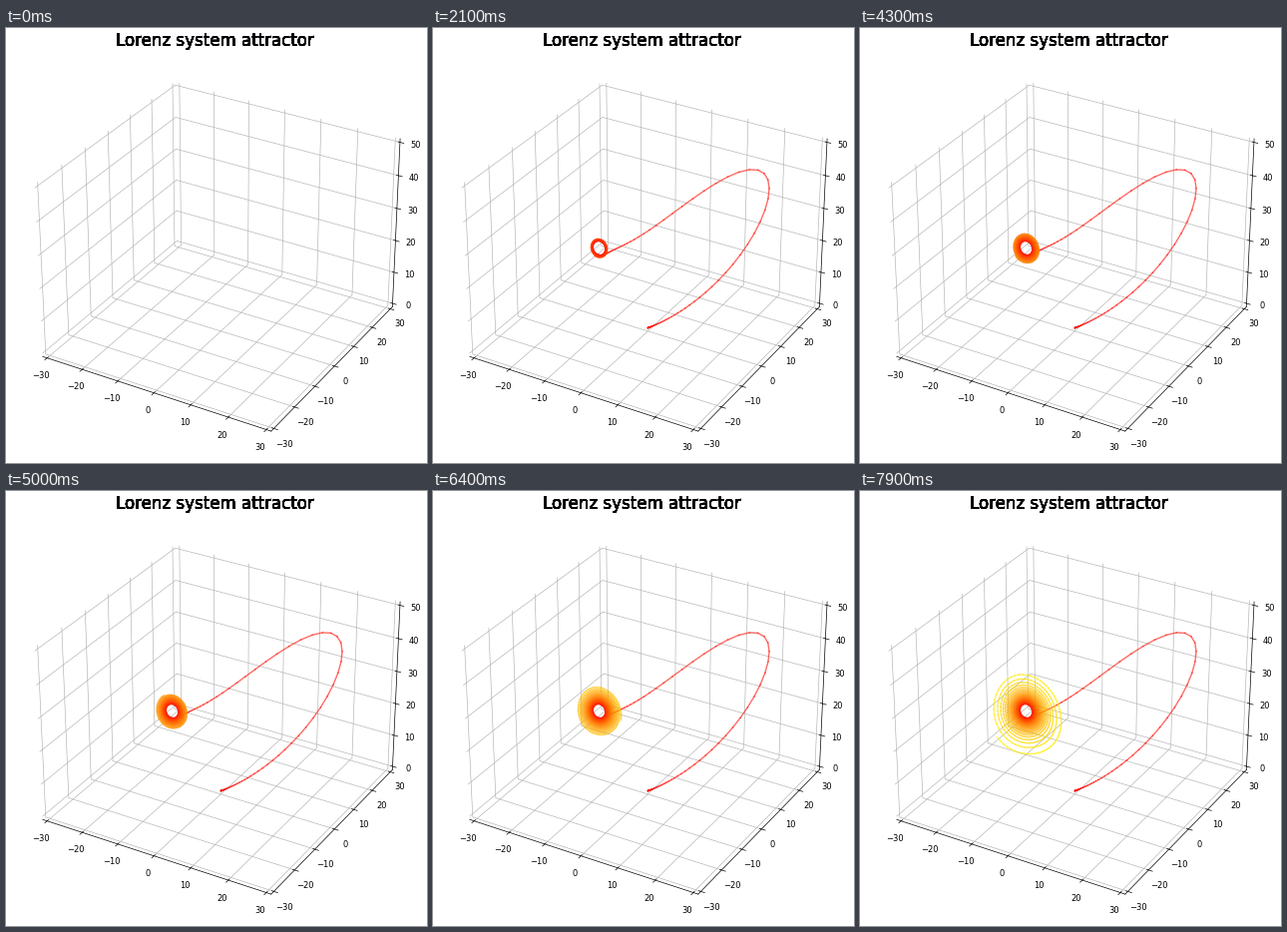
A matplotlib script for the animation above (8000 ms loop, 422 by 436 pixels).

```python
import colorsys

import numpy as np
import matplotlib.pyplot as plt
from matplotlib.animation import FuncAnimation
from mpl_toolkits.mplot3d.art3d import Line3DCollection

W, H, DPI = 422, 436, 100
FRAMES, INTERVAL = 80, 100
PER_FRAME = 20          # segments added each frame
DT = 0.01               # time covered by one segment
HUE_CYCLE = 10000       # segments per full turn of the colour wheel

plt.rcParams.update({
    "axes.linewidth": 0.5,
    "grid.linewidth": 0.45,
    "xtick.major.width": 0.5,
    "ytick.major.width": 0.5,
})


def lorenz(p, sigma=10.0, rho=28.0, beta=8 / 3):
    x, y, z = p
    return np.array([sigma * (y - x), x * (rho - z) - y, x * y - beta * z])


def rk4(p, h):
    k1 = lorenz(p)
    k2 = lorenz(p + h / 2 * k1)
    k3 = lorenz(p + h / 2 * k2)
    k4 = lorenz(p + h * k3)
    return p + h / 6 * (k1 + 2 * k2 + 2 * k3 + k4)


def trajectory(start, count):
    path = [np.array(start, dtype=float)]
    for _ in range(count):
        path.append(rk4(path[-1], DT))
    return np.array(path)


def padded(lo, hi):
    pad = (hi - lo) / 48
    return lo - pad, hi + pad


path = trajectory((0.05, 0, 0), (FRAMES - 1) * PER_FRAME)
segments = np.stack([path[:-1], path[1:]], axis=1)
colors = [colorsys.hsv_to_rgb(i / HUE_CYCLE, 1, 1) for i in range(len(segments))]

fig = plt.figure(figsize=(W / DPI, H / DPI), dpi=DPI, facecolor="white")
side = 407.5
ax = fig.add_axes([6.1 / W, 6.2 / H, side / W, side / H], projection="3d")
ax.view_init(elev=30, azim=-60)
ax.set_xlim(*padded(-30, 30))
ax.set_ylim(*padded(-30, 30))
ax.set_zlim(*padded(0, 50))
ax.set_xticks(range(-30, 31, 10))
ax.set_yticks(range(-30, 31, 10))
ax.set_zticks(range(0, 51, 10))
ax.tick_params(labelsize=6, pad=-1.1)
for axis in (ax.xaxis, ax.yaxis, ax.zaxis):
    axis.set_pane_color((1, 1, 1, 1))

# Stacked copies harden the antialiased edges of the title.
for _ in range(12):
    fig.text(209.7 / W, 1 - 18 / H, "Lorenz system attractor",
             fontsize=12, ha="center", va="baseline")

trail = Line3DCollection(segments, colors=colors, linewidths=1, alpha=0.6,
                         capstyle="projecting")
ax.add_collection3d(trail)


def draw(frame):
    count = frame * PER_FRAME
    trail.set_visible(count > 0)
    if count:
        trail.set_segments(segments[:count])
    return (trail,)


anim = FuncAnimation(fig, draw, frames=FRAMES, interval=INTERVAL,
                     init_func=lambda: draw(0), repeat=True, repeat_delay=0)
plt.show()
```
